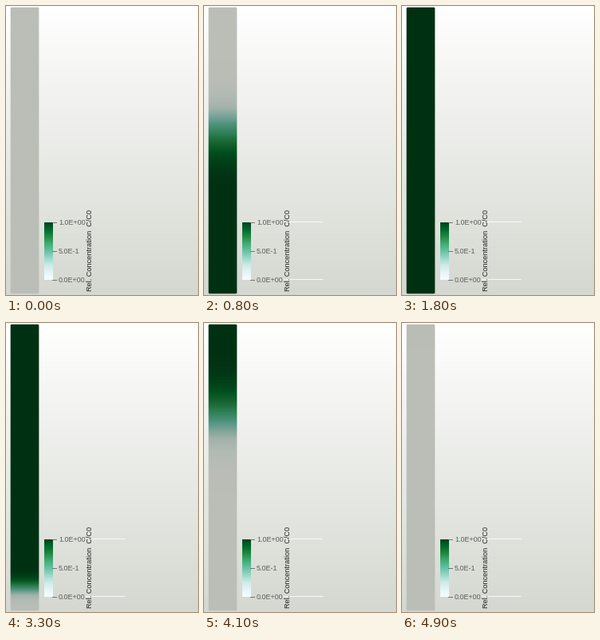
A matplotlib script for the animation above (5200 ms loop, 241 by 362 pixels).

```python
import math

import numpy as np
import matplotlib.pyplot as plt
from matplotlib.animation import FuncAnimation
from matplotlib.colors import LinearSegmentedColormap
from matplotlib.patches import FancyBboxPatch

W, H, DPI = 241, 362, 100
FRAMES, STEP_MS = 52, 100
PX = 72 / DPI  # points per pixel

LEFT, RIGHT, TOP, BOTTOM = 5, 42, 1, 361
INSET = 0.65   # soft edge of the column
SPEED = 26.4   # front travel per step
SPREAD = 11    # front width after one step
FILL_STEPS, FLUSH_START, FLUSH_STEPS = 18, 32, 17


def make_cmap(name, colors):
    return LinearSegmentedColormap.from_list(name, np.array(colors) / 255)


column_cmap = make_cmap("column", [
    (187, 190, 183), (177, 186, 180), (160, 178, 170), (118, 162, 150),
    (76, 145, 122), (48, 130, 88), (26, 105, 52), (0, 78, 30), (0, 48, 18)])
backdrop_cmap = make_cmap("backdrop", [(255, 255, 255), (213, 216, 208)])

erfc = np.vectorize(math.erfc)
height = BOTTOM - 1 - (np.arange(TOP, BOTTOM) + 0.5)


def breakthrough(t):
    """Advection-dispersion profile of an inflow from below."""
    if t == 0:
        return np.zeros_like(height)
    z = (height - SPEED * t) / (SPREAD * math.sqrt(t))
    return 0.5 * erfc(z / math.sqrt(2))


def concentration(k):
    if k < FLUSH_START:
        return breakthrough(min(k, FILL_STEPS))
    return 1 - breakthrough(min(k - FLUSH_START, FLUSH_STEPS))


fig = plt.figure(figsize=(W / DPI, H / DPI), dpi=DPI)
ax = fig.add_axes([0, 0, 1, 1])
ax.axis("off")


def show(values, cmap, box, **kw):
    x0, x1, y0, y1 = box
    return ax.imshow(np.reshape(values, (-1, 1)), cmap=cmap, vmin=0, vmax=1,
                     extent=(x0, x1, y1, y0), aspect="auto",
                     interpolation="nearest", **kw)


def rule(x0, x1, y, **kw):
    return ax.plot([x0, x1], [y, y], solid_capstyle="butt", snap=False,
                   zorder=2, **kw)[0]


show(np.linspace(0, 1, H), backdrop_cmap, (0, W, 0, H), zorder=0)

column = show(concentration(0), column_cmap, (LEFT, RIGHT, TOP, BOTTOM), zorder=1)
outline = FancyBboxPatch((LEFT + INSET, TOP + INSET),
                         RIGHT - LEFT - 2 * INSET, BOTTOM - TOP - 2 * INSET,
                         boxstyle="round,pad=0,rounding_size=1.5",
                         transform=ax.transData)
column.set_clip_path(outline)

# Colour legend
show(np.linspace(1, 0, 72), "BuGn", (48, 59, 271, 343), zorder=1)
ticks = [(271.5, "1.0E+00"), (307.5, "5.0E-1"), (343.5, "0.0E+00")]
for y, label in ticks:
    rule(58, 64, y, color="#686a66", lw=0.9 * PX)
    ax.text(66, y + 2.3, label, family="Liberation Sans", size=9.05 * PX,
            color="#5c5e5a", va="baseline", zorder=3)
ax.text(108.5, 357, "Rel. Concentration  C/C0", family="Liberation Sans",
        size=9.1 * PX, color="#1e201d", rotation=90, rotation_mode="anchor",
        ha="left", va="baseline", zorder=4)

guides = [rule(100, 149.5, y, color="white", alpha=0.85, lw=PX)
          for y in (270.5, 342.5)]

ax.set_xlim(0, W)
ax.set_ylim(H, 0)


def update(k):
    column.set_data(concentration(k).reshape(-1, 1))
    for line in guides:
        line.set_visible(k >= 7)
    return [column, *guides]


anim = FuncAnimation(fig, update, frames=FRAMES, interval=STEP_MS,
                     repeat=True, repeat_delay=0, blit=False)
plt.show()
```
